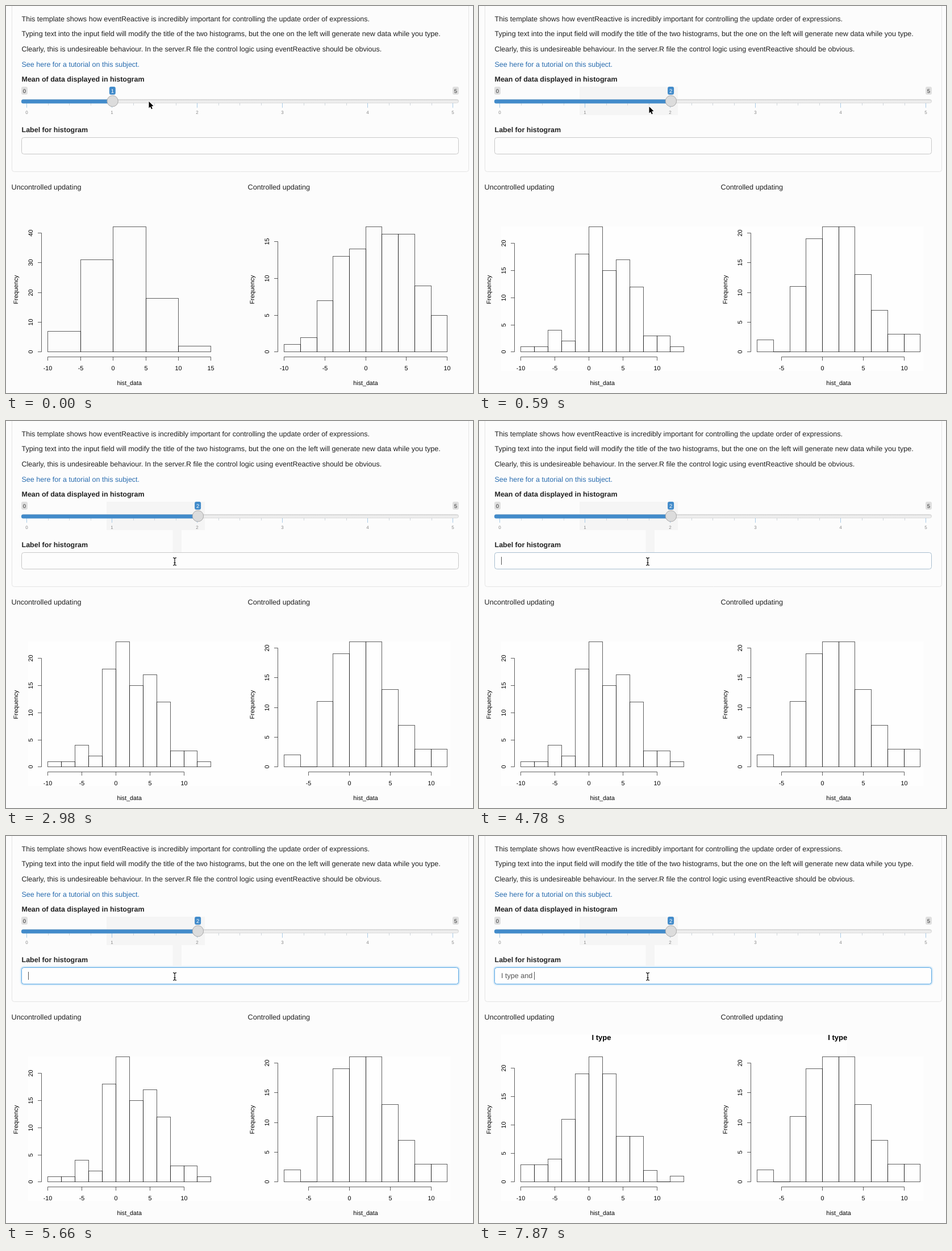
Animation of 822x681 px, one loop 8000 ms. Source, as an HTML page with a canvas:

```html
<!DOCTYPE html>
<html lang="en">
<head>
<meta charset="utf-8">
<title>Histogram demo</title>
<style>
html, body { margin: 0; width: 100%; height: 100%; overflow: hidden; background: #fcfcfc; }
canvas { display: block; }
</style>
</head>
<body>
<canvas id="stage" width="822" height="681"></canvas>
<script>
const ctx = document.getElementById('stage').getContext('2d');
const LOOP = 8000, PAGE = '#fcfcfc', FRESH = '#fefefe', STALE = '#f5f5f5', BLUE = '#428bca';
const SANS = '"Liberation Sans", Arial, sans-serif';

// Each track is a list of [start time, value]; a value holds until the next one.
const slider = [[0, 1], [150, 2]];
const pointer = [
  [0, ['arrow', 251.5, 168]], [150, ['arrow', 274, 171]], [300, ['arrow', 291, 175]],
  [440, ['arrow', 299.5, 177]], [1030, ['arrow', 299, 189]], [1180, ['arrow', 298, 211]],
  [1330, ['beam', 297, 237]], [1480, ['beam', 297, 246]], [2980, ['beam', 297, 247]]
];
const trailEnd = [[0, 0], [1030, 204], [1180, 226], [1330, 231]];
const focus = [[0, 0], [4780, 0.3], [4920, 0.75], [5070, 1]];
const caret = [[0, false], [4780, true], [5210, false], [5660, true], [7280, false], [7430, true]];
const typed = [
  [0, ''], [5810, 'I'], [5950, 'I t'], [6090, 'I ty'], [6240, 'I typ'], [6380, 'I type '],
  [7430, 'I type a'], [7580, 'I type an'], [7720, 'I type and'], [7870, 'I type and ']
];
const title = [[0, ''], [6830, 'I type ']];
const leftPlot = [
  [0, { min: -10, bin: 5, step: 10, counts: [7, 31, 42, 18, 2] }],
  [590, { min: -10, bin: 2, step: 5, counts: [1, 1, 4, 2, 18, 23, 15, 17, 12, 3, 3, 1] }],
  [6830, { min: -10, bin: 2, step: 5, counts: [3, 3, 4, 11, 19, 22, 19, 8, 8, 2, 0, 1] }]
];
const rightPlot = [
  [0, { min: -10, bin: 2, step: 5, counts: [1, 2, 7, 13, 14, 17, 16, 16, 9, 5] }],
  [590, { min: -8, bin: 2, step: 5, counts: [2, 0, 11, 19, 21, 21, 13, 7, 3, 3] }]
];

const at = (track, t) => track.filter(([start]) => start <= t).pop()[1];
const snap = v => Math.floor(v) + 0.5;
const mix = (a, b, k) => `rgb(${a.map((v, i) => Math.round(v + (b[i] - v) * k))})`;

function fill(color, x, y, w, h) {
  ctx.fillStyle = color;
  ctx.fillRect(x, y, w, h);
}

function text(str, x, y, size, color = '#222', align = 'left', weight = '') {
  ctx.font = `${weight} ${size}px ${SANS}`;
  ctx.textAlign = align;
  ctx.fillStyle = color;
  ctx.fillText(str, x, y);
}

function vertical(str, x, y, size) {
  ctx.save();
  ctx.translate(x, y);
  ctx.rotate(-Math.PI / 2);
  text(str, 0, 0, size, '#000', 'center');
  ctx.restore();
}

function line(color, ...pts) {
  ctx.strokeStyle = color;
  ctx.beginPath();
  for (let i = 0; i < pts.length; i += 2) ctx.lineTo(pts[i], pts[i + 1]);
  ctx.stroke();
}

function box(x, y, w, h, r, fillColor, strokeColor) {
  ctx.beginPath();
  ctx.roundRect(x, y, w, h, r);
  if (fillColor) { ctx.fillStyle = fillColor; ctx.fill(); }
  if (strokeColor) { ctx.strokeStyle = strokeColor; ctx.stroke(); }
}

function badge(str, x, bg, color) {
  box(x - 5.5, 142, 11, 14, 3, bg);
  text(str, x, 152.5, 9.5, color, 'center');
}

function drawSlider(value) {
  const x = 37 + value * 150.3;
  badge('0', 32.5, '#dfdfdf', '#333');
  badge('5', 791.5, '#dfdfdf', '#333');
  badge(value, x, BLUE, '#fff');
  for (let i = 0; i <= 20; i++) {
    const tick = snap(36.5 + i * 37.5), major = i % 4 === 0;
    line(major ? '#a9cbe6' : '#cfd6dc', tick, 171, tick, major ? 179 : 175);
    if (major) text(i / 4, tick, 190, 8, '#888', 'center');
  }
  const groove = ctx.createLinearGradient(0, 164, 0, 171);
  groove.addColorStop(0, '#dcdcdc');
  groove.addColorStop(1, '#fafafa');
  box(27.5, 164.5, 769, 6, 3, groove, '#d3d3d3');
  box(27, 164.5, x - 27, 7, [3, 0, 0, 3], BLUE);
  ctx.beginPath();
  ctx.arc(x + 0.3, 167.3, 9.7, 0, 2 * Math.PI);
  ctx.fillStyle = '#dcdcdc';
  ctx.fill();
  ctx.strokeStyle = '#aaa';
  ctx.stroke();
}

function drawInput(t) {
  const k = at(focus, t), str = at(typed, t);
  if (k > 0.5) {
    fill(PAGE, 25, 228, 775, 36);
    for (const w of [6, 4, 2.5]) {
      ctx.lineWidth = w;
      box(27.5, 231.5, 769, 29, 4, null, `rgba(102,175,233,${0.13 * k})`);
    }
    ctx.lineWidth = 1;
  }
  box(27.5, 231.5, 769, 29, 4, k ? '#fefefe' : '#fdfdfd', mix([200, 200, 200], [92, 168, 228], k));
  text(str, 39, 250, 12.6, '#555');
  if (at(caret, t)) {
    const x = snap(39 + ctx.measureText(str).width);
    line('#555', x, 239, x, 253);
  }
}

function drawPlot(left, { min, bin, step, counts }, heading) {
  const width = 287, peak = Math.max(...counts);
  const max = min + bin * counts.length;
  const px = v => snap(left + (v - min) / (max - min) * width);
  const py = n => snap(608.9 - n / peak * 220.1);
  const base = py(0), ink = 'rgba(0,0,0,0.62)';

  ctx.strokeStyle = ink;
  counts.forEach((n, i) => {
    const x = px(min + i * bin);
    ctx.strokeRect(x, py(n), px(min + (i + 1) * bin) - x, base - py(n));
  });

  const first = Math.ceil(min / 5) * 5, last = Math.floor(max / 5) * 5;
  line(ink, px(first), 617.5, px(last), 617.5);
  for (let v = first; v <= last; v += 5) {
    line(ink, px(v), 617.5, px(v), 624);
    text(v, px(v), 641, 10.8, '#000', 'center');
  }

  const axis = snap(left - 11), top = Math.floor(peak / step) * step;
  line(ink, axis, base, axis, py(top));
  for (let n = 0; n <= top; n += step) {
    line(ink, axis - 6.5, py(n), axis, py(n));
    vertical(n, left - 27, py(n), 10.8);
  }

  vertical('Frequency', left - 53, 499, 10.8);
  text('hist_data', left + 143.3, 666.5, 10.7, '#000', 'center');
  text(heading, left + 143.3, 359, 13, '#000', 'center', 'bold');
}

function drawPointer([kind, x, y]) {
  ctx.save();
  ctx.translate(x, y);
  if (kind === 'arrow') {
    ctx.beginPath();
    for (const [a, b] of [[0, 0], [0, 11.5], [2.6, 9.2], [4.5, 13.4], [6.3, 12.6], [4.5, 8.4], [8, 8.1]])
      ctx.lineTo(a, b);
    ctx.closePath();
    ctx.lineJoin = 'round';
    ctx.lineWidth = 2;
    ctx.strokeStyle = '#fff';
    ctx.stroke();
    ctx.fillStyle = '#000';
    ctx.fill();
  } else {
    ctx.lineWidth = 1.2;
    line('#111', 0, -5, 0, 5.5);
    line('#111', -3, -6.3, -1.2, -6.2, 0, -5, 1.2, -6.2, 3, -6.3);
    line('#111', -3, 6.8, -1.2, 6.7, 0, 5.5, 1.2, 6.7, 3, 6.8);
    line('#111', -1.6, 2.5, 1.6, 2.5);
  }
  ctx.restore();
}

function draw(t) {
  ctx.lineWidth = 1;
  ctx.textRendering = 'geometricPrecision';
  fill(PAGE, 0, 0, 822, 681);
  box(10.5, -10.5, 804, 302, 4, null, '#e5e5e5');

  // Repainted areas keep a slightly different background.
  if (t >= 150) fill(STALE, 177, 142, 173, 50);
  const end = at(trailEnd, t);
  if (end) fill(STALE, 293.5, 190, 15.5, end - 190);
  if (t >= 590) fill(FRESH, 39, 388, 743, 254);
  if (t >= 6830) fill(FRESH, 39, 349, 609, 261);

  text('This template shows how eventReactive is incredibly important for controlling the update order of expressions.', 27.5, 26.5, 12.58);
  text('Typing text into the input field will modify the title of the two histograms, but the one on the left will generate new data while you type.', 27.5, 53, 12.62);
  text('Clearly, this is undesireable behaviour. In the server.R file the control logic using eventReactive should be obvious.', 27.5, 80, 12.54);
  text('See here for a tutorial on this subject.', 27.5, 106.5, 12.54, '#2a6db0');
  text('Mean of data displayed in histogram', 27.5, 133, 12.5, '#222', 'left', 'bold');
  text('Label for histogram', 27.5, 222, 12.5, '#222', 'left', 'bold');
  text('Uncontrolled updating', 9.5, 323, 12.65);
  text('Controlled updating', 425.5, 323, 12.65);

  drawSlider(at(slider, t));
  drawInput(t);
  drawPlot(73.9, at(leftPlot, t), at(title, t));
  drawPlot(489.7, at(rightPlot, t), at(title, t));
  drawPointer(at(pointer, t));
}

const begin = performance.now();
function tick() {
  draw((performance.now() - begin) % LOOP);
  requestAnimationFrame(tick);
}
tick();
</script>
</body>
</html>
```
